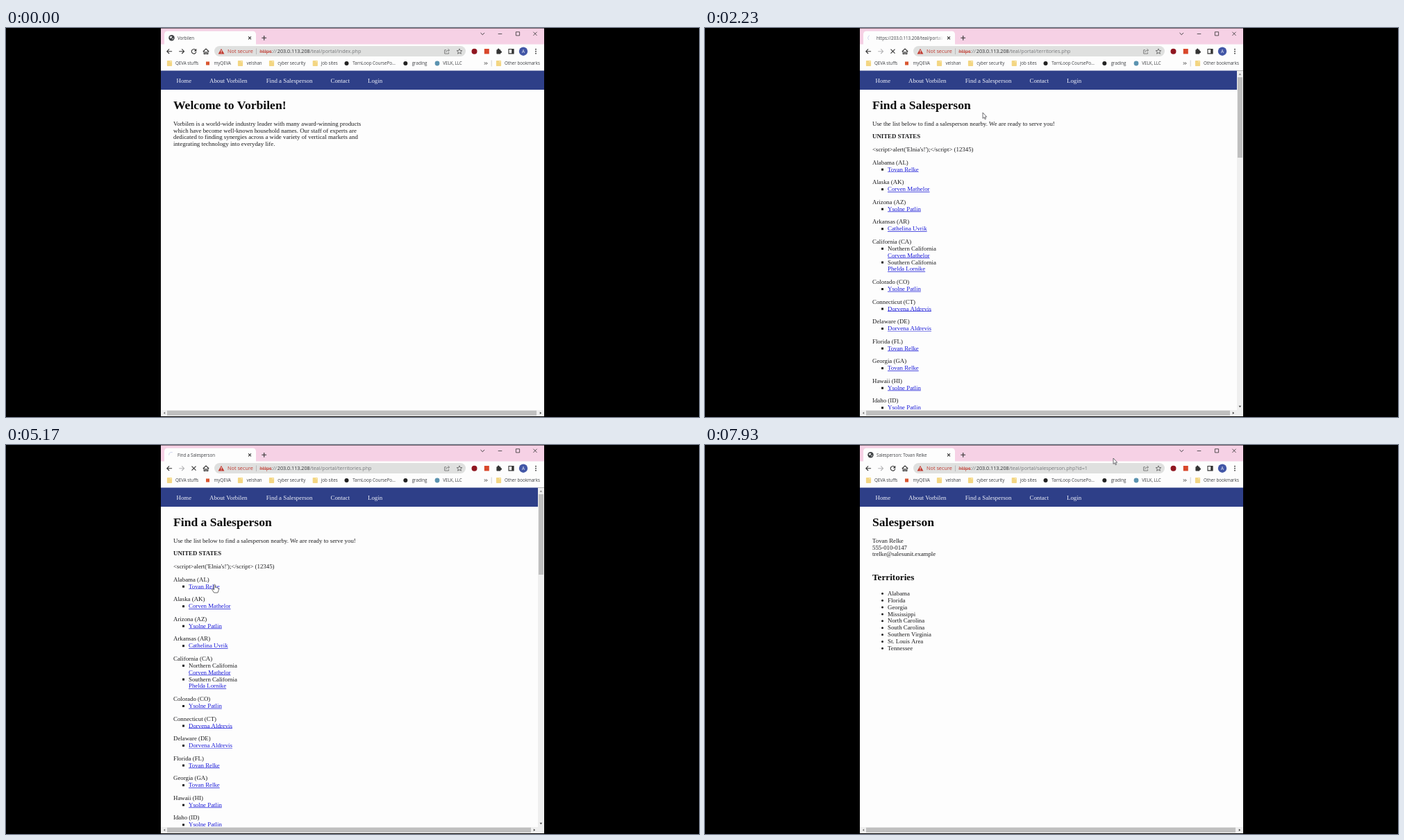
These frames come from a looping animation (998x561 px, 8000 ms). An HTML page with a canvas:

```html
<!DOCTYPE html>
<html lang="en">
<head>
<meta charset="utf-8">
<title>Browser session</title>
<style>
html, body { margin: 0; width: 100%; height: 100%; overflow: hidden; background: #000; }
canvas { display: block; }
</style>
</head>
<body>
<canvas id="stage" width="998" height="561"></canvas>
<script>
const ctx = document.getElementById('stage').getContext('2d');
const LOOP = 8000;
const SERIF = '"Liberation Serif", "Times New Roman", serif';
const SANS = '"Open Sans", "Noto Sans", sans-serif';
const BODY = 8.83, LINE = 9.88, GAP = 8.79;
const INK = '#1c1c1e', GREY = '#77797c', RED = '#c0392f', PAPER = '#fdfdfd';
const HOST = '203.0.113.208', ROOT = '/teal/portal/';

const rep = 'Tovan Relke', corven = 'Corven Mathelor', ysolne = 'Ysolne Patlin', dorvena = 'Dorvena Aldrevis';
const states = [
  ['Alabama (AL)', rep], ['Alaska (AK)', corven], ['Arizona (AZ)', ysolne],
  ['Arkansas (AR)', 'Cathelina Uvrik'],
  ['California (CA)', corven, 'Phelda Lornike'],
  ['Colorado (CO)', ysolne], ['Connecticut (CT)', dorvena], ['Delaware (DE)', dorvena],
  ['Florida (FL)', rep], ['Georgia (GA)', rep], ['Hawaii (HI)', ysolne], ['Idaho (ID)', ysolne]
];
const territories = ['Alabama', 'Florida', 'Georgia', 'Mississippi', 'North Carolina',
  'South Carolina', 'Southern Virginia', 'St. Louis Area', 'Tennessee'];

const pages = [
  { file: 'index.php', title: 'Vorbilen', draw: drawHome },
  { file: 'territories.php', title: 'Find a Salesperson', draw: drawList },
  { file: 'salesperson.php?id=1', title: 'Salesperson: ' + rep, draw: drawPerson }
];
// Each visit: click, new page shown, loading finished
const visits = [[1700, 2000, 2600], [5170, 5470, 5900]];

// Pointer tip: time, x, y
const path = [
  [130, 600, 0], [930, 404, 78], [1700, 404, 78], [2230, 400, 122], [2800, 400, 122],
  [3600, 304, 211], [3670, 304, 211], [4070, 300.5, 201], [6130, 300.5, 201],
  [6600, 443, 213], [7200, 443, 213], [7930, 588, 19], [8000, 588, 19]
];

function text(s, x, y, size = BODY, color = INK, family = SERIF, weight = 400) {
  ctx.font = `${weight} ${size}px ${family}`;
  ctx.fillStyle = color;
  ctx.fillText(s, x, y);
  return ctx.measureText(s).width;
}
const ui = (s, x, y, color = '#3c3e42', size = 6.2) => text(s, x, y, size, color, SANS);

function box(x, y, w, h, color, r = 0) {
  ctx.fillStyle = color;
  ctx.beginPath();
  ctx.roundRect(x, y, w, h, r);
  ctx.fill();
}

function dot(x, y, r, color) {
  ctx.fillStyle = color;
  ctx.beginPath();
  ctx.arc(x, y, r, 0, 7);
  ctx.fill();
}

function stroke(d, x, y, color = '#333', width = 1.1) {
  ctx.save();
  ctx.translate(x, y);
  ctx.strokeStyle = color;
  ctx.lineWidth = width;
  ctx.stroke(new Path2D(d));
  ctx.restore();
}

function shape(d, x, y, color, edge) {
  ctx.save();
  ctx.translate(x, y);
  const p = new Path2D(d);
  ctx.fillStyle = color;
  ctx.fill(p);
  if (edge) {
    ctx.strokeStyle = edge;
    ctx.lineWidth = 0.8;
    ctx.stroke(p);
  }
  ctx.restore();
}

function link(s, x, y) {
  const w = text(s, x, y, BODY, '#1a1ad8');
  box(x, y + 0.8, w, 0.7, '#1a1ad8');
}

const heading = s => text(s, 241, 116.6, 17.6, '#0c0c0c', SERIF, 700);
const lines = (list, y) => list.forEach((s, i) => text(s, 241, y + i * LINE));

function drawHome() {
  heading('Welcome to Vorbilen!');
  lines(['Vorbilen is a world-wide industry leader with many award-winning products',
    'which have become well-known household names. Our staff of experts are',
    'dedicated to finding synergies across a wide variety of vertical markets and',
    'integrating technology into everyday life.'], 140.7);
}

function drawList() {
  heading('Find a Salesperson');
  let y = 140.7;
  const step = LINE + GAP;
  text('Use the list below to find a salesperson nearby. We are ready to serve you!', 241, y);
  text('UNITED STATES', 241, y += step, BODY, INK, SERIF, 700);
  text("<script>alert('Elnia's!');<\/script> (12345)", 241, y += step);
  const bullet = () => box(254, y - 4, 3, 3, INK);
  for (const [name, ...people] of states) {
    text(name, 241, y += step);
    people.forEach((person, i) => {
      y += LINE;
      bullet();
      if (people.length > 1) {
        text(['Northern', 'Southern'][i] + ' California', 263, y);
        y += LINE;
      }
      link(person, 263, y);
    });
  }
}

function drawPerson() {
  heading('Salesperson');
  lines([rep, '555-010-0147', 'trelke@salesunit.example'], 140.7);
  text('Territories', 241, 195, 13.2, '#0c0c0c', SERIF, 700);
  territories.forEach((s, i) => {
    const y = 216.9 + i * LINE;
    dot(255.5, y - 2.6, 1.5, INK);
    text(s, 263, y);
  });
}

function drawPage(index) {
  const right = index === 1 ? 766 : 775;
  ctx.save();
  ctx.beginPath();
  ctx.rect(223, 61, right - 223, 490);
  ctx.clip();
  box(223, 61, 552, 490, PAPER);
  box(223, 61.5, 552, 27.5, '#2e3f88');
  const nav = [['Home', 245.5], ['About Vorbilen', 293], ['Find a Salesperson', 374.7],
    ['Contact', 467.5], ['Login', 521]];
  for (const [s, x] of nav) text(s, x, 78.7, BODY, '#f0f2fa');
  pages[index].draw();
  ctx.restore();

  box(223, 551, 552, 9, '#efefef');
  box(232, 551.8, right - 11 - 232 + (index === 1 ? 1 : 0), 7, '#bfbfbf');
  shape('M1.2 -1.8L-1.2 0L1.2 1.8Z', 228, 555.2, '#777');
  shape('M-1.2 -1.8L1.2 0L-1.2 1.8Z', right - 5, 555.2, '#444');
  if (index === 1) {
    box(766, 61.5, 9, 490, '#efefef');
    box(767, 71, 7, 116, '#bfbfbf');
    shape('M-1.8 1.2L0 -1.2L1.8 1.2Z', 770.4, 66.5, '#888');
    shape('M-1.8 -1.2L0 1.2L1.8 -1.2Z', 770.4, 546, '#444');
  }
}

function drawTab(title, loading, t) {
  box(223, 0.5, 552, 24, '#f6d1e5');
  box(228, 4.5, 132, 22, PAPER, [4.5, 4.5, 0, 0]);
  if (loading) {
    const a = t / 150;
    ctx.strokeStyle = '#cfd3ec';
    ctx.lineWidth = 1;
    ctx.beginPath();
    ctx.arc(238.5, 14.3, 3.8, a, a + 2);
    ctx.stroke();
  } else {
    dot(238.5, 14.3, 4.2, '#3d4043');
    shape('M-3 -1.2L-.5 -2.8L1 -1.3L-.3 0L-1 1.2ZM.6 1L2.9 .3L1.5 2.8Z', 238.5, 14.3, '#e9e9ea');
  }
  const fade = ctx.createLinearGradient(330, 0, 344, 0);
  fade.addColorStop(0, '#3c3e42');
  fade.addColorStop(1, 'rgba(60,62,66,0)');
  ctx.save();
  ctx.beginPath();
  ctx.rect(247, 5, 97, 18);
  ctx.clip();
  ui(title, 247, 16.6, fade);
  ctx.restore();
  stroke('M-2 -2L2 2M2 -2L-2 2', 351, 14.3);
  stroke('M-3.4 0H3.4M0 -3.4V3.4', 371.7, 14.3);
  stroke('M-2.8 -1.3L0 1.4L2.8 -1.3', 686.3, 8.3, '#333', 0.9);
  stroke('M-2.8 0H2.8', 711.5, 8.5, '#333', 0.8);
  stroke('M-2.6 -2.6H2.6V2.6H-2.6Z', 737, 8.3, '#333', 0.8);
  stroke('M-2.6 -2.6L2.6 2.6M2.6 -2.6L-2.6 2.6', 762, 8.3, '#333', 0.8);
}

function drawToolbar(file, loading, canForward) {
  const y = 33.7;
  box(223, 23.5, 552, 38, PAPER);
  stroke('M3.8 0H-3.3M-.2 -3.3L-3.5 0L-.2 3.3', 235.3, y);
  stroke('M-3.8 0H3.3M.2 -3.3L3.5 0L.2 3.3', 253, y, canForward ? '#333' : '#b4b4b6');
  if (loading) {
    stroke('M-3 -3L3 3M3 -3L-3 3', 270.5, y);
  } else {
    stroke('M2.6 -2A3.3 3.3 0 1 0 3.3 .6', 270.5, y);
    shape('M3.8 -4V-.3H.2Z', 270.5, y, '#333');
  }
  stroke('M-4.2 .3L0 -3.6L4.2 .3M-2.8 -.6V3.8H-.9V1H.9V3.8H2.8V-.6', 288, y);

  box(300, 26, 362, 15, '#dfe0df', 7.5);
  shape('M0 -4L4.4 3.7H-4.4Z', 310, y, RED);
  box(309.6, y - 1.6, 0.9, 2.7, '#fff');
  box(309.6, y + 1.8, 0.9, 0.9, '#fff');
  ui('Not secure', 319, 36.4, RED, 7.3);
  box(360.3, 29.5, 0.7, 8.5, '#aaa');
  const w = ui('https', 365.3, 36.4, RED, 7.2);
  box(365.3, 34, w, 0.7, RED);
  ui('://', 365.3 + w, 36.4, GREY, 7.2);
  const hostWidth = ui(HOST, 390.8, 36.4, '#303134', 7.2);
  ui(ROOT + file, 390.8 + hostWidth, 36.4, GREY, 7.2);

  stroke('M-1 -2H-3.3V3.3H2.6V1.5M-1.3 1.3C-1 -1 .5 -1.6 3.2 -1.6M1.6 -3.5L3.6 -1.6L1.6 .3', 635, y, '#666', 0.8);
  stroke('M0 -3.8L1.1 -1.2L3.8 -1L1.7 .8L2.4 3.5L0 2L-2.4 3.5L-1.7 .8L-3.8 -1L-1.1 -1.2Z', 653, y, '#555', 0.8);
  dot(674.5, y, 4, '#8f1620');
  box(688.8, y - 3.7, 7, 7.4, '#d8472b');
  box(706.4, y - 2.4, 6, 6.2, '#333', 0.7);
  dot(709.2, y - 2.6, 1.5, '#333');
  dot(712.5, y + 0.7, 1.5, '#333');
  stroke('M-3.5 -3.2H3.5V3.2H-3.5Z', 727.5, y, '#333');
  box(728.2, y - 3.2, 3, 6.4, '#333');
  dot(745, y, 6.2, '#4256a6');
  ui('A', 743, y + 2.3, '#e8ebf8', 6.4);
  for (const d of [-3, 0, 3]) dot(763, y + d, 0.9, '#333');
}

function drawBookmarks() {
  const y = 51, base = 53.3;
  const folder = x => {
    box(x - 3.6, y - 4, 7.2, 8, '#f3d683', 0.8);
    box(x + 0.6, y - 2.8, 2.4, 0.9, '#fdf1c8');
  };
  [235.5, 337.5, 382.5, 445.3, 709.5].forEach(folder);
  box(288, y - 2.5, 5, 5, '#d9552f');
  dot(490.5, y, 3, '#222');
  dot(575.3, y, 3, '#222');
  dot(621, y, 3.4, '#5b93b0');
  const labels = [['QEVA stuffs', 244], ['myQEVA', 299.5], ['velshan', 346.5], ['cyber security', 391.3],
    ['job sites', 453.8], ['TarnLoop CoursePo...', 499.3], ['grading', 584.7], ['VELK, LLC', 629.3],
    ['Other bookmarks', 718]];
  for (const [s, x] of labels) ui(s, x, base);
  stroke('M-2 -1.7L-.4 0L-2 1.7M.5 -1.7L2.1 0L.5 1.7', 691, y, '#333', 0.9);
  box(698.8, 46.5, 0.7, 9, '#bbb');
}

function pointerAt(t) {
  const i = path.findIndex(k => k[0] > t);
  if (i < 1) return i === 0 ? null : path[path.length - 1].slice(1);
  const [t0, x0, y0] = path[i - 1], [t1, x1, y1] = path[i];
  const p = (t - t0) / (t1 - t0), e = p * p * (3 - 2 * p);
  return [x0 + (x1 - x0) * e, y0 + (y1 - y0) * e];
}

function drawPointer(t, page) {
  const tip = pointerAt(t);
  if (!tip) return;
  const [x, y] = tip;
  const overNav = x > 374 && x < 442 && y > 69 && y < 83;
  const overName = page === 1 && x > 262 && x < 309 && y > 198 && y < 208;
  if (overNav || overName) {
    shape('M-.9 .8Q0 -.6 .9 .8V4.4Q2 3.7 2.7 4.8Q3.8 4.2 4.3 5.3Q5.6 4.9 5.7 6.3V8.6L4.4 12H-.9L-3.6 8Q-4.2 6.7 -2.8 6.4L-.9 7.8Z',
      x, y, '#fff', '#444');
  } else {
    shape('M0 0V8.4L1.9 6.7L3.2 9.7L4.5 9.1L3.2 6.2H5.7Z', x, y, '#fff', '#4a4a50');
  }
}

function draw(t) {
  const page = visits.filter(v => t >= v[1]).length;
  const visit = visits.find(v => t >= v[0] && t < v[2]);
  const { file, title } = pages[page];
  const shown = visit && t >= visit[1];
  box(0, 0, 998, 561, '#000');
  drawTab(shown ? 'https://' + HOST + ROOT + file : title, !!visit, t);
  drawToolbar(file, !!visit, page === 0);
  drawBookmarks();
  drawPage(page);
  drawPointer(t, page);
}

const start = performance.now();
function tick() {
  draw((performance.now() - start) % LOOP);
  requestAnimationFrame(tick);
}
tick();
</script>
</body>
</html>
```
